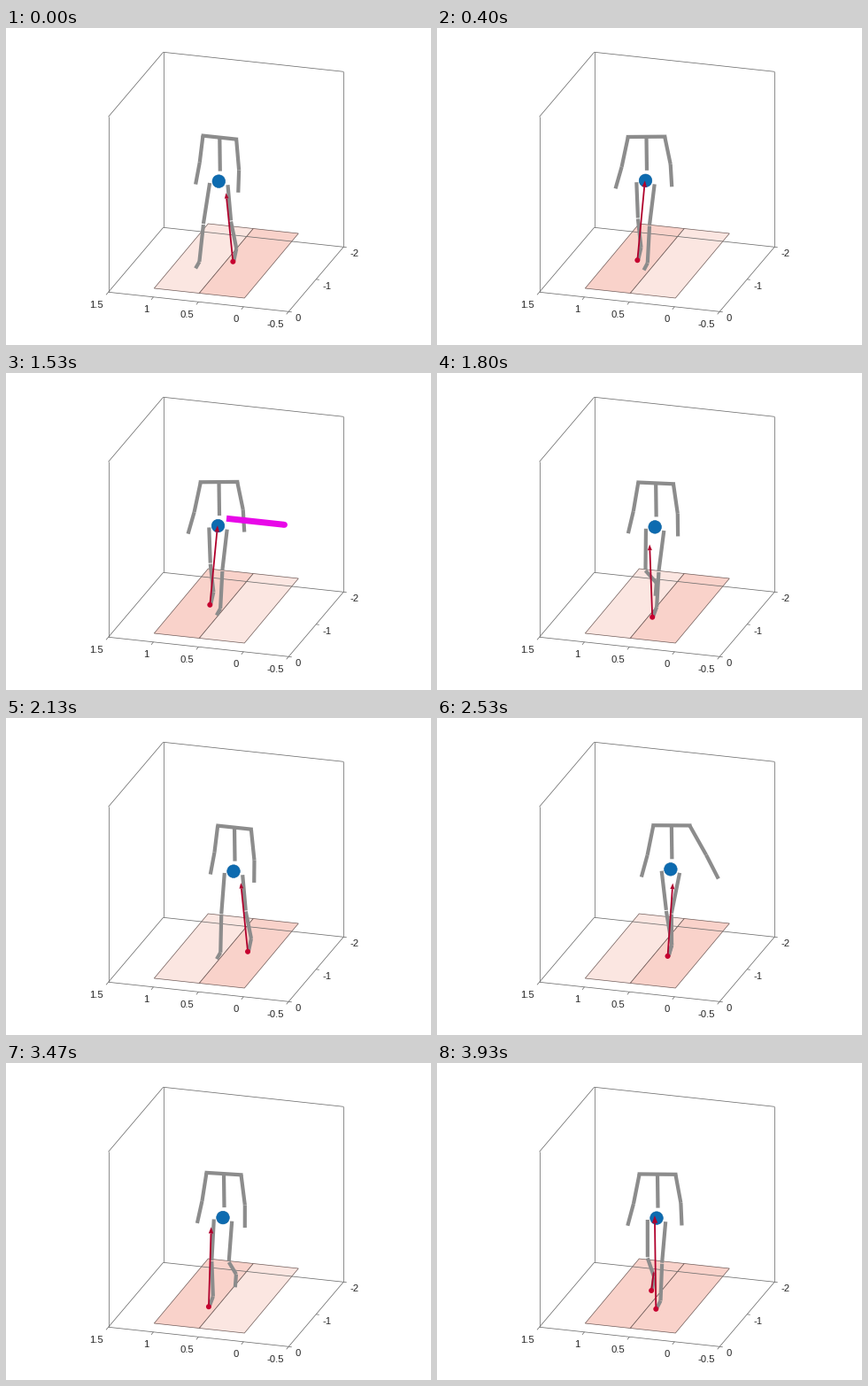
A matplotlib script for the animation above (3.99 s loop, 480 by 358 pixels).

```python
import numpy as np
import matplotlib.pyplot as plt
from matplotlib.animation import FuncAnimation
from matplotlib.patches import Circle, Polygon

W, H, DPI = 480, 358, 100
FRAMES, LOOP = 60, 3990
PX = 72 / DPI

GREY, BLUE, RED, MAGENTA = "#8c8c8c", "#0d6bb0", "#b0002c", "#e808e8"
LIGHT, DARK, AXIS = "#fbe6e1", "#f9d2ca", "#6a6a6a"

fig = plt.figure(figsize=(W / DPI, H / DPI), dpi=DPI, facecolor="white")
ax = fig.add_axes([0, 0, 1, 1])
ax.set_xlim(0, W)
ax.set_ylim(H, 0)
ax.axis("off")


def line(pts, color, width, z):
    x, y = np.transpose(pts)
    return ax.plot(x, y, color=color, lw=width * PX, zorder=z,
                   solid_capstyle="butt", solid_joinstyle="miter")[0]


# Room, 2 m along each axis, seen from above its near left corner
O = np.array([177.6, 225.3])
ACROSS, NEAR, UP = np.array([203.6, 22]), np.array([-62, 73]), np.array([0, -198])


def metres(across, near, up):
    return (across * ACROSS + near * NEAR + up * UP) / 2


EDGES = [(O, ACROSS), (O, NEAR), (O, UP), (O + UP, ACROSS), (O + UP, NEAR),
         (O + NEAR, UP), (O + ACROSS, UP), (O + NEAR, ACROSS), (O + ACROSS, NEAR)]
for p, d in EDGES:
    line([p, p + d], AXIS, 0.75, 2)


def label(x, y, s, ha):
    ax.text(x, y, s, family="Liberation Sans", size=11.2 * PX, color="#262626",
            ha=ha, va="center_baseline")


for k, s in enumerate(["1.5", "1", "0.5", "0", "-0.5"]):
    p = O + NEAR + ACROSS * k / 4
    line([p, p + [-2.5, 3]], AXIS, 0.75, 2)
    label(p[0] - 5.5, p[1] + 13.5, s, "right")
for k, s in enumerate(["-2", "-1", "0"]):
    p = O + ACROSS + NEAR * k / 2
    line([p, p + [3.5, 0.5]], AXIS, 0.75, 2)
    label(p[0] + 7.5, p[1] + 7, s, "left")
line([(0, 357.5), (W, 357.5)], "#c4c4c4", 1, 2)

# Two treadmill belts
corner, wide, long = np.array([228.3, 221]), np.array([51, 5.5]), np.array([-61, 73])
belts = []
for k in range(2):
    p = corner + k * wide
    belts.append(ax.add_patch(Polygon([p, p + wide, p + wide + long, p + long],
                                      fc=LIGHT, ec="#6e5a57", lw=0.7 * PX, zorder=1)))

# Gait cycles walked and pelvis position at a few moments
WHEN = np.array([0, 6, 15, 23, 32, 37, 45, 52, 59.])
CYCLES = [.96, 1.43, 1.91, 2.44, 2.96, 3.26, 3.73, 4.14, 4.56]
PELVIS = np.array([240.3, 235.5, 242, 239.5, 257, 264, 252.5, 245, 248])
SLOPE = np.gradient(PELVIS, WHEN)

STANCE = 0.6            # share of the cycle a foot is on the ground
PUSH = (22, 27)         # sideways pull on the pelvis
STUMBLE = 3             # the cycle whose left step lands on the right belt


def ease(t):
    """Smooth curve through the pelvis positions."""
    k = int(np.clip(np.searchsorted(WHEN, t, "right") - 1, 0, len(WHEN) - 2))
    h = WHEN[k + 1] - WHEN[k]
    u = (t - WHEN[k]) / h
    return ((1 + 2 * u) * (1 - u) ** 2 * PELVIS[k] + u * (1 - u) ** 2 * h * SLOPE[k]
            + u * u * (3 - 2 * u) * PELVIS[k + 1] - u * u * (1 - u) * h * SLOPE[k + 1])


def wave(s, shift=0):
    return np.cos(2 * np.pi * (s - shift))


def bump(t, mid, width):
    return np.exp(-((t - mid) / width) ** 2 / 2)


def limb(length, deg, out):
    """Segment hanging down, swung forward by deg and sideways by out."""
    a = np.radians(deg)
    return metres(out, length * np.sin(a), -length * np.cos(a))


def leg(hub, side, s, shift):
    """Hip, knee, ankle and toe; s is 0 at this foot's heel strike."""
    thigh = 11.75 + 16.5 * wave(s) - 8 * wave(s, .25) - 4.25 * wave(2 * s)
    bend = 5 + 12 * bump(s, .14, .06) + 60 * bump(s, .7, .12)
    out = side * (.025 * wave(2 * s) - .01) + shift
    hip = hub + metres(.1 * side, 0, -.03)
    knee = hip + limb(.44, thigh, out)
    ankle = knee + limb(.41, thigh - bend, out)
    return hip, knee, ankle, ankle + limb(.14, 65 + thigh - bend, 0)


def arm(shoulder, side, s, reach):
    swing = 2 - 10 * wave(s, .93)
    elbow = shoulder + limb(.33, swing, .05 * side + reach)
    return elbow, elbow + limb(.24, swing + 20, .03 * side + reach)


def force(side, s):
    """Ground reaction: two humps, leaning inwards towards push-off."""
    if s >= STANCE:
        return np.zeros(2)
    fade = min(1, s / .05, (STANCE - s) / .16)
    size = fade * (86 + 22 * wave(s / .38, .06 / .38) * (1 - 1.9 * s))
    return size * np.array([-.22 * side * s, -1])


class Arrow:
    def __init__(self):
        self.stem = line([(0, 0), (0, 0)], RED, 1.8, 7)
        self.dot = ax.add_patch(Circle((0, 0), 3, fc="#c6002f", lw=0, zorder=7))
        self.head = ax.add_patch(Polygon([(0, 0)] * 3, fc=RED, lw=0, zorder=7))
        self.parts = [self.stem, self.dot, self.head]

    def set(self, base, vec, on):
        size = np.hypot(*vec)
        on = on and size > 1
        for part in self.parts:
            part.set_visible(on)
        if not on:
            return
        d = vec / size
        n = np.array([-d[1], d[0]]) * size * .03
        tip, back = base + vec, base + vec * .92
        self.stem.set_data(*np.transpose([base, back]))
        self.dot.center = base
        self.head.set_xy([tip, back + n, back - n])


bones = [line([(0, 0), (0, 0)], GREY, 4.2, 4) for _ in range(12)]
ball = ax.add_patch(Circle((0, 0), 7.3, fc=BLUE, ec="#0a5f9e", lw=0.4, zorder=5))
push = line([(0, 0), (0, 0)], MAGENTA, 7, 6)
push_end = ax.add_patch(Circle((0, 0), 3.4, fc=MAGENTA, lw=0, zorder=6))
arrows = [Arrow(), Arrow()]


def draw(i):
    cycle = np.interp(i, WHEN, CYCLES)
    hub = np.array([ease(i), 173 + 2.2 * wave(2 * cycle, .16)])
    mid = hub + (1, -49.5)
    half = metres(.185, .03 * wave(cycle, .93) - .03, 0)
    segs = [(mid - 1.1 * half, mid + 1.1 * half), (mid, hub + (1.5, -11.5))]

    feet, loads, on = [], [], []
    for side in (-1, 1):
        s = (cycle + (side > 0) / 2) % 1
        cross = .05 * bump(i, 34.5, 3) * (side < 0)
        reach = .14 * bump(i, 37, 2) * (side > 0)
        hip, knee, ankle, toe = leg(hub, side, s, cross)
        shoulder = mid + side * half
        elbow, hand = arm(shoulder, side, s, reach)
        segs += [(shoulder, elbow), (elbow, hand), (hip, knee),
                 (knee + (0, 1), ankle), (ankle, toe)]
        feet.append(toe + (-1, 1))
        loads.append(force(side, s))
        on.append(s < STANCE)
    for bone, seg in zip(bones, segs):
        bone.set_data(*np.transpose(seg))
    ball.center = hub

    # Both feet on one belt act as a single force
    if int(cycle) == STUMBLE and on[0]:
        total = loads[0] + loads[1]
        share = loads[0][1] / total[1]
        feet[1] = share * feet[0] + (1 - share) * feet[1]
        loads[1] = total
        on = [False, True]
    for k in range(2):
        belts[k].set_facecolor(DARK if on[k] else LIGHT)
        arrows[k].set(feet[k], loads[k], on[k])

    pushed = PUSH[0] <= i < PUSH[1]
    push.set_visible(pushed)
    push_end.set_visible(pushed)
    push.set_data(*np.transpose([hub + (9.5, -8.3), hub + (74.5, -1.3)]))
    push_end.center = hub + (75, -1.2)
    return []


anim = FuncAnimation(fig, draw, frames=FRAMES, interval=LOOP / FRAMES,
                     repeat=True, repeat_delay=0, blit=False)
plt.show()
```
